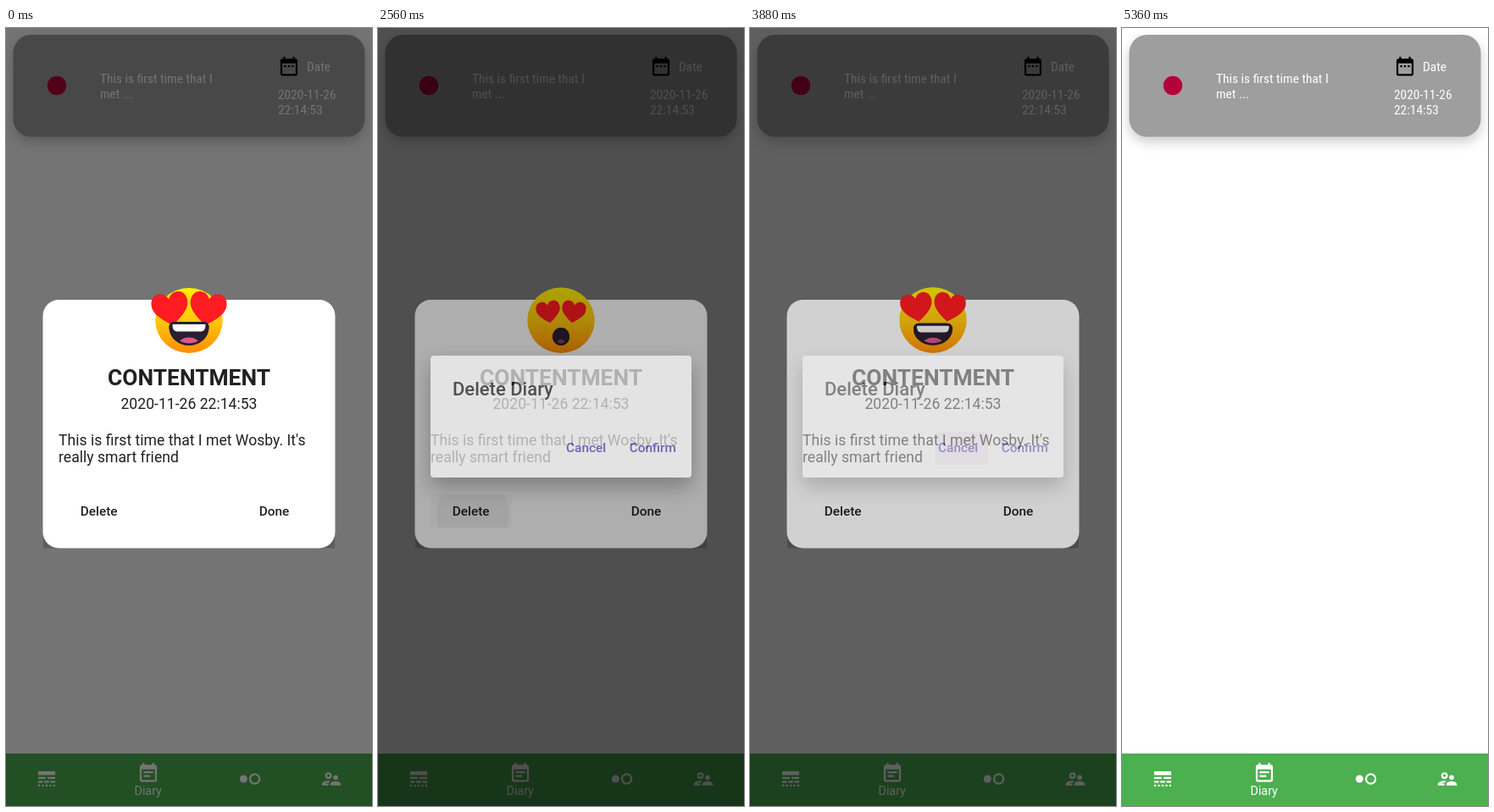
Animation of 432x919 px, one loop 5400 ms. Source, as an HTML page:

```html
<!DOCTYPE html>
<html lang="en">
<head>
<meta charset="utf-8">
<title>Diary</title>
<style>
  html, body { margin: 0; width: 100%; height: 100%; overflow: hidden; background: #fff; }
  svg { display: block; width: 100%; height: 100%; }
  text { font-family: Roboto, sans-serif; fill: #212121; font-size: 17.6px; }
  .condensed text { font-family: "Roboto Condensed", Roboto, sans-serif; font-stretch: condensed; font-size: 16px; fill: #fff; }
  .button { font-size: 15.4px; font-weight: 500; }
  .purple { fill: #5a3ab2; }
  .middle { text-anchor: middle; }
  .entry { filter: drop-shadow(0 6px 7px rgba(0, 0, 0, .2)); }
  .alert { filter: drop-shadow(0 11px 12px rgba(0, 0, 0, .42)); }
</style>
</head>
<body>
<svg viewBox="0 0 432 919" preserveAspectRatio="none">
  <defs>
    <linearGradient id="skin" x2="0" y2="1">
      <stop offset="0" stop-color="#fff000"/>
      <stop offset=".5" stop-color="#ffc90e"/>
      <stop offset="1" stop-color="#ff8c00"/>
    </linearGradient>
    <path id="heart" d="M0 .9C-.5 .55-1 .15-1-.3C-1-.75-.72-.9-.5-.9C-.25-.9-.08-.75 0-.55C.08-.75.25-.9.5-.9C.72-.9 1-.75 1-.3C1 .15.5.55 0 .9Z" fill="#ff1b22"/>
    <clipPath id="mouthClip"><path id="mouthHole"/></clipPath>
    <clipPath id="deleteClip"><rect x="62" y="551" width="96" height="39" rx="2"/></clipPath>
    <clipPath id="doneClip"><rect x="269" y="551" width="96" height="39" rx="2"/></clipPath>
    <clipPath id="cancelClip"><rect x="219" y="477" width="62" height="39" rx="2"/></clipPath>
  </defs>

  <rect width="432" height="919" fill="#fff"/>
  <rect class="entry" x="8.5" y="8" width="415" height="120.5" rx="21" fill="#9e9e9e"/>
  <circle cx="60" cy="68" r="11.2" fill="#b4003a"/>
  <g class="condensed">
    <text id="summary" x="111" y="65.3">This is first time that I</text>
    <text x="111" y="83">met ...</text>
    <text x="355" y="51">Date</text>
    <text x="321" y="84">2020-11-26</text>
    <text x="321" y="101.7">22:14:53</text>
  </g>
  <path id="calendar" d="M9 11H7v2h2v-2zm4 0h-2v2h2v-2zm4 0h-2v2h2v-2zm2-7h-1V2h-2v2H8V2H6v2H5c-1.1 0-2 .9-2 2v14c0 1.1.9 2 2 2h14c1.1 0 2-.9 2-2V6c0-1.1-.9-2-2-2zm0 16H5V9h14v11z"/>

  <rect y="857" width="432" height="62" fill="#4caf50"/>
  <g fill="#fff">
    <path id="lines" d="M3 16h5v-2H3zm6.5 0h5v-2h-5zm6.5 0h5v-2h-5zM3 20h2v-2H3zm4 0h2v-2H7zm4 0h2v-2h-2zm4 0h2v-2h-2zm4 0h2v-2h-2zM3 12h8v-2H3zm10 0h8v-2h-8zM3 4v4h18V4z"/>
    <path id="note" d="M17 10H7v2h10v-2zm2-7h-1V1h-2v2H8V1H6v2H5c-1.1 0-2 .9-2 2v14c0 1.1.9 2 2 2h14c1.1 0 2-.9 2-2V5c0-1.1-.9-2-2-2zm0 16H5V8h14v11zm-5-5H7v2h7v-2z"/>
    <circle cx="280.3" cy="887" r="4.5"/>
    <circle cx="293.6" cy="887" r="5.6" fill="none" stroke="#fff" stroke-width="2.2"/>
    <g id="people">
      <circle cx="9" cy="8.5" r="2.5" fill="none" stroke="#fff" stroke-width="2"/>
      <circle cx="16.5" cy="10.5" r="2.5"/>
      <path d="M9 17H4.8c1-.5 2.7-1 4.2-1h.3c.4-.7 1-1.3 1.7-1.8-.7-.1-1.4-.2-2-.2-2.3 0-7 1.2-7 3.5V19h7zM16.5 14.5c-1.8 0-5.5 1-5.5 3V19h11v-1.5c0-2-3.7-3-5.5-3z"/>
    </g>
  </g>
  <text class="middle" x="167.7" y="906.3" style="fill:#fff;font-size:14.3px">Diary</text>

  <rect id="shade" width="432" height="919"/>
  <g id="entryDialog">
    <rect x="44" y="596" width="344" height="18.5" opacity=".2"/>
    <rect x="43.5" y="321" width="345" height="293.5" rx="19" fill="#fff"/>
    <ellipse id="face" cx="216" rx="39.7" fill="url(#skin)"/>
    <use id="heartL" href="#heart"/>
    <use id="heartR" href="#heart"/>
    <path id="mouth" fill="#2a1f30"/>
    <g clip-path="url(#mouthClip)">
      <ellipse id="tongue" cx="216" fill="#d9588c"/>
      <path id="teeth" fill="#fff"/>
      <path id="lip" fill="none" stroke="#2a1f30" stroke-width="5"/>
    </g>
    <text class="middle" x="216" y="422" style="font-size:26.4px;font-weight:700">CONTENTMENT</text>
    <text class="middle" x="216" y="449.7">2020-11-26 22:14:53</text>
    <text x="62" y="492.5">This is first time that I met Wosby. It's</text>
    <text x="62" y="513.3">really smart friend</text>
    <g clip-path="url(#deleteClip)">
      <rect id="deleteGlow" x="62" y="551" width="96" height="39"/>
      <circle id="deleteRipple" cx="112" cy="574"/>
    </g>
    <g clip-path="url(#doneClip)">
      <rect id="doneGlow" x="269" y="551" width="96" height="39"/>
      <circle id="doneRipple" cx="313" cy="577"/>
    </g>
    <text class="button" x="87.7" y="576.3">Delete</text>
    <text class="button" x="298.7" y="576.3">Done</text>
  </g>

  <rect id="alertShade" width="432" height="919"/>
  <g id="alertDialog">
    <rect class="alert" x="62" y="387" width="308" height="144" rx="4" fill="#fff"/>
    <text x="88" y="434.3" style="font-size:22px;font-weight:500">Delete Diary</text>
    <g clip-path="url(#cancelClip)" fill="#673ab7">
      <rect id="cancelGlow" x="219" y="477" width="62" height="39"/>
      <circle id="cancelRipple" cx="256" cy="502"/>
    </g>
    <text class="button purple" x="222" y="501.3">Cancel</text>
    <text class="button purple" x="296.7" y="501.3">Confirm</text>
  </g>
</svg>

<script>
const LOOP = 5400, BARRIER = 0.545, FADE = 150;
const $ = id => document.getElementById(id);
const set = (id, attrs) => { for (const k in attrs) $(id).setAttribute(k, attrs[k]); };
const clamp = v => Math.min(1, Math.max(0, v));
const mix = (a, b, u) => a + (b - a) * u;
const ramp = (t, start, length) => clamp((t - start) / length);
const easeOut = u => 1 - Math.pow(1 - u, 1.7);
const smooth = u => u * u * (3 - 2 * u);

// heart width, heart y, mouth width, mouth top, mouth bottom, face top
const poses = {
  burst: [43, 332, 47, 347, 375, 307],
  grin: [38, 329.5, 47, 348, 375, 306],
  half: [32, 337, 37, 356, 371, 309],
  squash: [28, 338, 22, 358, 374, 308],
  gasp: [28.5, 335.5, 20, 354, 375, 306.5]
};
const track = [
  [0, 'burst'], [400, 'burst'], [640, 'grin'], [860, 'burst'], [1080, 'grin'], [1320, 'grin'],
  [1640, 'half'], [1720, 'squash'], [1800, 'gasp'], [2640, 'gasp'], [2760, 'half'],
  [2900, 'burst'], [3160, 'grin'], [3420, 'burst'], [3800, 'grin'], [4240, 'half'],
  [4320, 'squash'], [4400, 'gasp'], [LOOP, 'gasp']
];

function poseAt(t) {
  const i = Math.max(1, track.findIndex(key => key[0] > t));
  const [t0, from] = track[i - 1], [t1, to] = track[i];
  const u = smooth(ramp(t, t0, t1 - t0));
  return poses[from].map((v, n) => mix(v, poses[to][n], u));
}

function mouthPath(w, top, bottom, open) {
  const h = bottom - top, l = 216 - w / 2, r = 216 + w / 2;
  const k = mix(h / 2, 6, open), a = mix(w / 2, 6, open);
  const side = top + k, low = side + (h - k) * 0.57, pull = w * 0.27;
  return `M${l} ${side}C${l} ${top + k * .45} ${l + a * .45} ${top} ${l + a} ${top}H${r - a}` +
    `C${r - a * .45} ${top} ${r} ${top + k * .45} ${r} ${side}` +
    `C${r} ${low} ${216 + pull} ${bottom} 216 ${bottom}S${l} ${low} ${l} ${side}Z`;
}

function drawEmoji(t) {
  const [heart, heartY, width, top, bottom, faceTop] = poseAt(t);
  const open = clamp((width - 20) / 27), h = bottom - top;
  set('face', { cy: (faceTop + 384) / 2, ry: (384 - faceTop) / 2 });
  const off = heart / 2 + 0.5, s = heart / 2;
  set('heartL', { transform: `translate(${216 - off} ${heartY}) rotate(-9) scale(${s})` });
  set('heartR', { transform: `translate(${216 + off} ${heartY}) rotate(9) scale(${s})` });
  const d = mouthPath(width, top, bottom, open);
  for (const id of ['mouth', 'mouthHole', 'lip']) set(id, { d });
  set('tongue', { cy: bottom - 1, rx: width * 0.27, ry: h * 0.3, opacity: mix(0.5, 1, open) });
  const x = width / 2 - 4;
  set('teeth', {
    d: `M${216 - x} ${top + 3}H${216 + x}Q${216 + x} ${top + 3 + h * .3} ${216 + x - 5} ${top + 3 + h * .3}` +
      `H${216 - x + 5}Q${216 - x} ${top + 3 + h * .3} ${216 - x} ${top + 3}Z`,
    opacity: open
  });
}

// Highlight while held, ripple growing from the touch point.
function drawPress(name, t, down, up, strength) {
  const fade = 1 - ramp(t, up, 160);
  set(name + 'Glow', { opacity: strength * ramp(t, down, 80) * fade });
  set(name + 'Ripple', {
    r: 70 * Math.pow(ramp(t, down + 60, 180), 2),
    opacity: t > down + 60 ? strength * 1.3 * fade : 0
  });
}

function draw(t) {
  const entry = 1 - ramp(t, 4342, FADE);
  const alert = t < 3200 ? ramp(t, 2490, FADE) : 1 - ramp(t, 3775, FADE);
  set('shade', { opacity: BARRIER * smooth(entry) ** 0.7 });
  set('entryDialog', { opacity: easeOut(entry) });
  set('alertShade', { opacity: BARRIER * smooth(alert) ** 0.7 });
  set('alertDialog', { opacity: easeOut(alert) });
  drawEmoji(t);
  drawPress('delete', t, 2360, 2490, 0.05);
  drawPress('cancel', t, 3600, 3790, 0.08);
  drawPress('done', t, 4220, 4342, 0.05);
}

function icon(id, x, y) {
  set(id, { transform: `translate(${x} ${y}) scale(1.12) translate(-12 -12)` });
}
icon('calendar', 334, 45.2);
icon('lines', 48, 887);
icon('note', 168, 880.3);
icon('people', 384, 887);

// Pick a size that suits whichever condensed face is available.
const size = 16 * 133 / $('summary').getComputedTextLength();
for (const label of document.querySelectorAll('.condensed text')) label.style.fontSize = size + 'px';

const begin = performance.now();
function tick() {
  draw((performance.now() - begin) % LOOP);
  requestAnimationFrame(tick);
}
tick();
</script>
</body>
</html>
```
